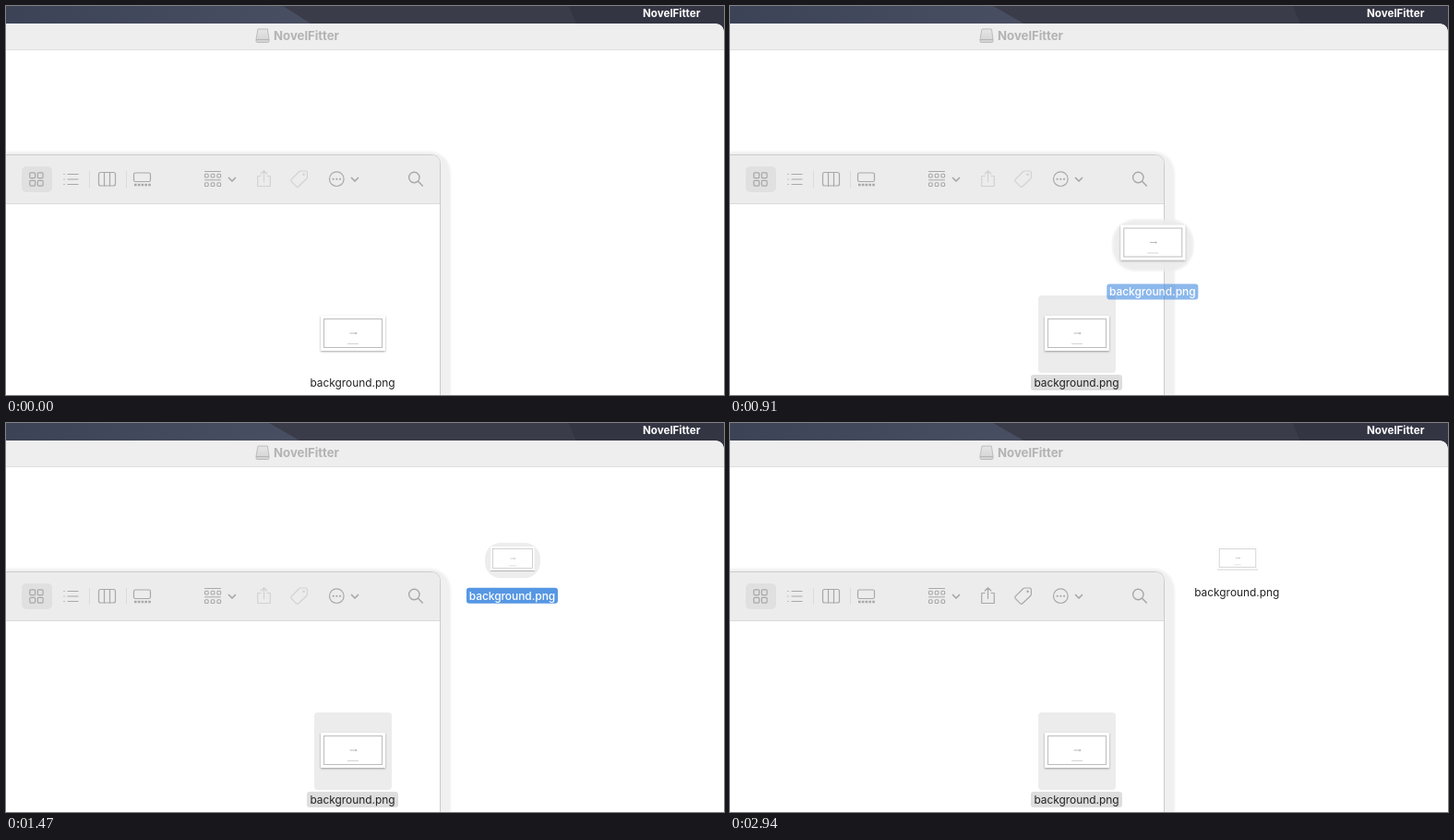
An HTML page that plays this animation: 778x422 px, repeating every 3080 ms.

```html
<!DOCTYPE html>
<html lang="en">
<head>
<meta charset="utf-8">
<title>Drag a file</title>
<style>
  html, body { margin: 0; width: 100%; height: 100%; overflow: hidden; background: #fff; }
  svg { display: block; width: 778px; height: 422px; font-family: Inter, Roboto, sans-serif; }
  .name { font-size: 11.9px; text-anchor: middle; fill: #242424; }
  .tools { fill: none; stroke: #a8a8a8; stroke-width: 1.2; stroke-linecap: round; stroke-linejoin: round; }
</style>
</head>
<body>
<svg viewBox="0 0 778 422">
  <defs>
    <linearGradient id="sky"><stop stop-color="#3c4357"/><stop offset="1" stop-color="#494f62"/></linearGradient>
    <linearGradient id="disk" x2="0" y2="1"><stop stop-color="#e6e6e6"/><stop offset="1" stop-color="#d2d2d2"/></linearGradient>
    <filter id="soft" x="-20%" y="-20%" width="140%" height="140%"><feGaussianBlur stdDeviation="1"/></filter>
    <filter id="shade" x="-20%" y="-20%" width="140%" height="150%">
      <feDropShadow dx="0" dy="1" stdDeviation="1" flood-opacity=".35"/>
    </filter>
    <g id="thumb">
      <rect x="-35" y="-19" width="70" height="38" fill="#fff" filter="url(#shade)"/>
      <rect x="-31.5" y="-15.5" width="63" height="31" fill="#fff" stroke="#bcbcbc"/>
      <path d="M-3.5 0H4M2.5-.8L4 0 2.5 .8" fill="none" stroke="#aaa" stroke-width=".8"/>
      <path d="M-6 11.5H6" stroke="#cacaca" stroke-width=".8"/>
    </g>
  </defs>

  <rect width="778" height="422" fill="#3b3c4a"/>
  <path id="slope" fill="url(#sky)"/>
  <path d="M610 0H778V30H622Z" fill="#333543"/>
  <text x="690" y="12" font-size="11.6" font-weight="700" fill="#fff">NovelFitter</text>

  <path d="M0 19H767Q778 19 778 30V422H0Z" fill="#fff"/>
  <path d="M0 19H767Q778 19 778 30V47H0Z" fill="#eeeeee"/>
  <path d="M0 47.5H778" stroke="#dedede"/>
  <path d="M273 25H283.4L285 36V38Q285 39.5 283.7 39.5H272.3Q271 39.5 271 38V36Z" fill="url(#disk)" stroke="#b8b8b8" stroke-width=".9"/>
  <path d="M271 36.5H285" stroke="#b0b0b0" stroke-width=".9"/>
  <text x="290" y="37" font-size="13.2" font-weight="700" fill="#b3b3b3">NovelFitter</text>

  <path d="M0 158H461Q482 161 482 186V422H0Z" fill="#f0f0f0" filter="url(#soft)"/>
  <path d="M-2 161.5H460Q470.5 161.5 470.5 172V424H-2Z" fill="#fff" stroke="#cbcbcb"/>
  <path d="M0 162H460Q470 162 470 172V214H0Z" fill="#ececec"/>
  <path d="M0 214.5H470" stroke="#dadada"/>

  <rect x="17" y="174" width="33" height="28" rx="5" fill="#e0e0e0"/>
  <path d="M90.5 179V197M130.5 179V197" stroke="#dcdcdc"/>
  <g class="tools">
    <g id="grid"></g>
    <path d="M67 182.5H78M67 188H78M67 193.5H78M62.8 182.5H63.2M62.8 188H63.2M62.8 193.5H63.2" />
    <rect x="100.5" y="180.5" width="18" height="14.5" rx="2"/>
    <path d="M106.5 181V195M112.5 181V195"/>
    <rect x="138.5" y="181" width="18" height="9.5" rx="1.8"/>
    <path d="M139 194H157" stroke-width="2.6" stroke-dasharray="2.6 1.2" stroke-linecap="butt"/>
    <path d="M215.5 179.5H232.5M215.5 188.8H232.5" stroke-width="1"/>
    <g id="groups" stroke-width="1.1"></g>
    <path d="M241.5 186.5L245 190 248.5 186.5M374.5 186.5L378 190 381.5 186.5" stroke-width="1.7"/>
    <g id="actions">
      <path d="M276 184.5H272.7V195.5H286.3V184.5H283M279.5 190.5V178.8M276.2 182L279.5 178.8 282.8 182"/>
      <path d="M317.3 180Q318.4 179 319.8 179H324.6Q326.4 179 326.4 180.8V185.4Q326.4 186.8 325.4 187.8L317 195.8Q315.8 196.8 314.6 195.8L309.2 190.4Q308.2 189.2 309.2 188.1Z"/>
      <circle cx="322.6" cy="182.8" r=".7"/>
    </g>
    <circle cx="358.3" cy="187.7" r="7.8"/>
    <path d="M354.6 187.7H354.7M358.3 187.7H358.4M362 187.7H362.1" stroke-width="2.1"/>
    <circle cx="442.3" cy="186" r="5.7" stroke-width="1.4"/>
    <path d="M446.6 190.3L451.3 195" stroke-width="1.6"/>
  </g>

  <g id="picked">
    <rect x="334" y="314" width="84" height="84" rx="4" fill="#ececec"/>
    <rect x="326" y="400" width="99" height="17" rx="3" fill="#dedede"/>
  </g>
  <use href="#thumb" x="376" y="355"/>
  <text class="name" x="375.5" y="412.7">background.png</text>

  <g id="copied">
    <use href="#thumb" transform="translate(550 146.5) scale(.63)"/>
    <text class="name" x="549.3" y="187.7">background.png</text>
  </g>

  <g id="drag">
    <g id="dragIcon">
      <rect x="-44" y="-25" width="88" height="56" rx="25" fill="#ececec" opacity=".9" filter="url(#soft)"/>
      <use href="#thumb"/>
    </g>
    <g id="dragName">
      <rect x="-49.5" y="-8.5" width="99" height="17" rx="3" fill="#4a90e2"/>
      <text class="name" y="4.2" style="fill:#fff" font-weight="500">background.png</text>
    </g>
  </g>
</svg>
<script>
const LOOP = 3080, STEP = 70;
const el = id => document.getElementById(id);
const clamp = v => Math.max(0, Math.min(1, v));
const smooth = p => p * p * (3 - 2 * p);
const easeOut = p => 1 - (1 - p) ** 3;
const mix = (a, b, p) => a + (b - a) * p;
const span = (t, from, to) => clamp((t - from) / (to - from));
const show = (id, on) => el(id).setAttribute('display', on ? 'inline' : 'none');

const square = (x, y, size, r) => `<rect x="${x}" y="${y}" width="${size}" height="${size}" rx="${r}"/>`;
const squares = (xs, ys, size, r) => ys.map(y => xs.map(x => square(x, y, size, r)).join('')).join('');
el('grid').innerHTML = squares([25.8, 34.3], [180.8, 189.3], 5.8, 1);
el('groups').innerHTML = squares([215.5, 222.2, 228.9], [182.3, 191.8], 3.7, 1);

// time, x, y of the dragged picture
const route = [[700, 376, 355], [1050, 503, 203], [1120, 515, 187], [1190, 541, 149]];

function routeAt(t) {
  let i = 0;
  while (i < route.length - 2 && t > route[i + 1][0]) i++;
  const [from, x0, y0] = route[i], [to, x1, y1] = route[i + 1];
  let p = span(t, from, to);
  if (i === 0) p = smooth(p);
  return [mix(x0, x1, p), mix(y0, y1, p)];
}

function draw(time) {
  const t = Math.floor(time / STEP) * STEP;
  el('slope').setAttribute('d', t < 70 ? 'M0 0H300L330 19V30H0Z' : 'M0 0H285L318 19V30H0Z');
  show('picked', t >= 350);
  show('copied', t >= 2170);
  el('actions').setAttribute('stroke', t >= 2240 ? '#a8a8a8' : '#d2d2d2');

  show('drag', t > 700 && t < 1960);
  const land = easeOut(span(t, 1190, 1540));
  const [rx, ry] = routeAt(t);
  const x = mix(rx, 549, land), y = mix(ry, 147, land);
  el('dragIcon').setAttribute('transform', `translate(${x} ${y}) scale(${mix(1, 0.68, land)})`);
  el('dragName').setAttribute('transform', `translate(${x - 0.5} ${y + mix(53.5, 40.2, land)})`);
  el('dragName').setAttribute('opacity', mix(0.63, 1, span(t, 1050, 1190)) - 0.07 * land);
  el('drag').setAttribute('opacity', t >= 1890 ? 0.5 : 1);
}

function tick(now) {
  draw(now % LOOP);
  requestAnimationFrame(tick);
}
draw(0);
requestAnimationFrame(tick);
</script>
</body>
</html>
```
